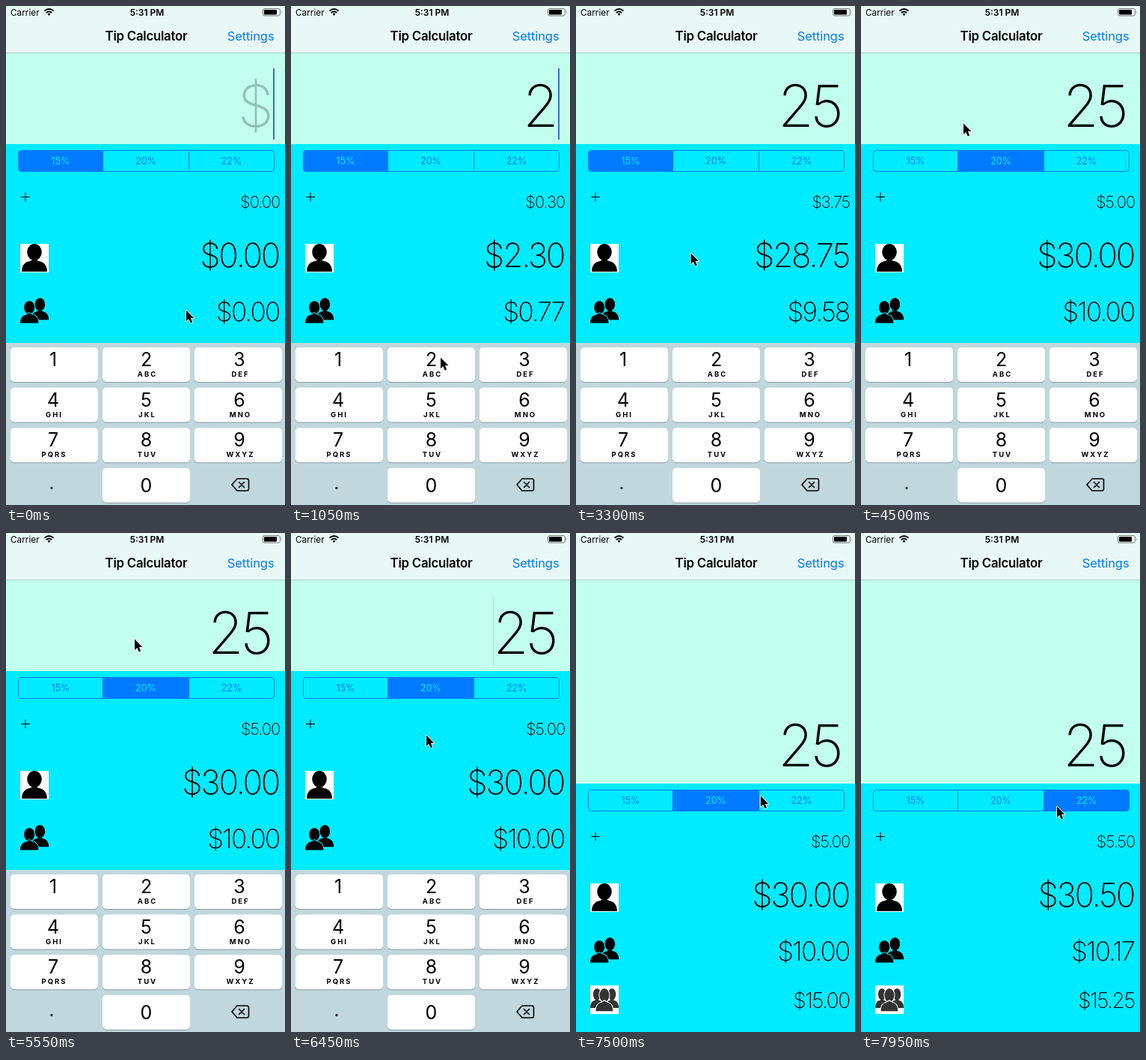
An HTML page that plays this animation: 373x665 px, repeating every 8 s.

```html
<!DOCTYPE html>
<html lang="en">
<head>
<meta charset="utf-8">
<title>Tip Calculator</title>
<style>
  html, body { margin: 0; width: 100%; height: 100%; overflow: hidden; background: #00ebff; }
  svg { display: block; width: 373px; height: 665px; font-family: Inter, Roboto, sans-serif; }
  .thin { font-weight: 200; text-anchor: end; letter-spacing: -.05em; }
  .mid { text-anchor: middle; }
  .end { text-anchor: end; }
  .bold { font-weight: 600; }
  .blue { fill: #007aff; }
</style>
</head>
<body>
<svg viewBox="0 0 373 665">
  <defs>
    <g id="person">
      <ellipse cx="19" cy="11" rx="9.8" ry="11"/>
      <path d="M2 37c0-9 5-13 11-14L19 20l6 3c6 1 11 5 11 14Z"/>
    </g>
  </defs>
  <rect width="373" height="665" fill="#00ebff"/>
  <rect id="field" y="63" width="373" height="121" fill="#c2ffee"/>
  <g id="content">
    <text id="bill" class="thin" x="354" y="161" font-size="77.500"></text>
    <g id="segments"></g>
    <path d="M20 254.5h12M26 248.5v12" stroke="#000" stroke-width="1"/>
    <g id="amounts"></g>
    <rect x="19" y="317" width="38" height="38" fill="#fff"/>
    <use href="#person" x="19" y="317"/>
    <use href="#person" transform="translate(32 389) scale(.7 .79)"/>
    <g stroke="#00ebff" stroke-width="2.5" paint-order="stroke">
      <use href="#person" transform="translate(17.5 393) scale(.72 .8)"/>
    </g>
    <g fill="#333">
      <rect x="19" y="453" width="38" height="38" fill="#fff"/>
      <use href="#person" transform="translate(18 457) scale(.53 .7)"/>
      <use href="#person" transform="translate(38 457) scale(.53 .7)"/>
      <g stroke="#fff" stroke-width="3" paint-order="stroke">
        <use href="#person" transform="translate(25.200 457) scale(.67 .82)"/>
      </g>
    </g>
  </g>
  <rect id="caret" y="83" width="2" height="95" fill="#4169dd"/>
  <g id="keyboard">
    <rect y="449" width="373" height="216" fill="#bfd7dd"/>
    <g id="keys"></g>
    <text class="mid" x="61" y="644" font-size="24">.</text>
    <g fill="none" stroke="#000" stroke-width="1.6" stroke-linejoin="round" stroke-linecap="round">
      <path d="M309 630h13q2.500 0 2.500 2.500v11q0 2.500-2.500 2.500h-13l-7-8Z"/>
      <path d="m311.500 634.500 7 7m0-7-7 7"/>
    </g>
  </g>
  <g id="bar">
    <rect width="373" height="63" fill="#e7f8f6"/>
    <rect y="62" width="373" height="1" fill="#a9d3ca"/>
    <text x="6" y="12.500" font-size="11.800">Carrier</text>
    <g fill="none" stroke="#000" stroke-width="2">
      <path d="M51.500 6.500q6-5 12 0M53.800 9q3.700-3 7.400 0"/>
      <path d="M55.600 10.500q1.900-1.500 3.800 0L57.500 13Z" fill="#000" stroke="none"/>
    </g>
    <text class="mid bold" x="188.500" y="12.500" font-size="12">5:31 PM</text>
    <rect x="343.500" y="3.500" width="23" height="9.500" rx="2.500" fill="none" stroke="#777"/>
    <rect x="345" y="5" width="17" height="6.500" rx="1"/>
    <path d="M368 6.500q1.500 1.700 0 3.500Z" fill="#777"/>
    <text class="mid bold" x="187.500" y="46" font-size="16.800" letter-spacing="-.25">Tip Calculator</text>
    <text class="end blue" x="358.500" y="46" font-size="16.500" letter-spacing="-.1">Settings</text>
  </g>
  <path id="pointer" d="M1 1.500v14.500l3.300-3 2.400 5.500 2.500-1-2.300-5.400h4.400Z" stroke="#fff" stroke-width="1.600" paint-order="stroke" stroke-linejoin="round"/>
</svg>
<script>
const $ = id => document.getElementById(id);
const LOOP = 8000, STEP = 150;

const rates = [15, 20, 22];
const edges = [16.5, 129.5, 244.5, 358.5];
$('segments').innerHTML = rates.map((rate, i) => `
  <path class="segment" d="${[
    'M129.500 192.500H20.500q-4 0-4 4v20q0 4 4 4H129.500Z',
    'M129.500 192.500H244.500V220.500H129.500Z',
    'M244.500 192.500H354.500q4 0 4 4v20q0 4-4 4H244.500Z'][i]}" stroke="#007aff"/>
  <text class="rate mid" x="${(edges[i] + edges[i + 1]) / 2}" y="211" font-size="12.500">${rate}%</text>`).join('');

// baseline, font size
const rows = [[269, 22], [348, 44], [420, 35.2], [483, 28]];
$('amounts').innerHTML = rows.map(([y, size]) =>
  `<text class="thin amount" x="${367 - size * .04}" y="${y}" font-size="${size}"></text>`).join('');

const letters = ['', 'ABC', 'DEF', 'GHI', 'JKL', 'MNO', 'PQRS', 'TUV', 'WXYZ'];
const key = (digit, col, row, label = '') => {
  const x = 6 + col * 123, y = 455 + row * 53.6, cx = 63 + col * 124.5;
  return `<rect x="${x}" y="${y + 1}" width="117" height="46" rx="5" fill="#8a9a9f"/>
    <rect id="key${digit}" x="${x}" y="${y}" width="117" height="46" rx="5" fill="#fff"/>
    <text class="mid" x="${cx}" y="${y + (digit ? 25 : 32)}" font-size="25">${digit}</text>
    <text class="mid" x="${cx + 1.5}" y="${y + 39}" font-size="9.500" font-weight="700" letter-spacing="2">${label}</text>`;
};
$('keys').innerHTML = letters.map((label, i) => key(i + 1, i % 3, Math.floor(i / 3), label)).join('') + key(0, 1, 3);

// time, x, y
const path = [
  [0, 240, 404], [900, 199, 467], [1050, 199, 467], [1500, 187, 527], [1950, 187, 528],
  [2400, 179, 485], [3000, 131, 406], [3750, 185, 211], [4050, 185, 211], [4500, 136, 155],
  [5100, 176, 142], [5250, 171, 140], [5700, 171, 140], [6000, 158, 180], [6450, 180, 268],
  [6750, 180, 268], [7650, 259, 365], [7950, 261, 363]
];
const blinks = [[450, 900], [2250, 2700], [3150, 3600], [4200, 4650], [5550, 6000]];
const within = (t, [from, to]) => t >= from && t < to;

function pointerAt(t) {
  const i = Math.max(1, path.findIndex(p => p[0] >= t));
  const [t0, x0, y0] = path[i - 1], [t1, x1, y1] = path[i];
  const k = (t - t0) / (t1 - t0);
  return [x0 + (x1 - x0) * k, y0 + (y1 - y0) * k];
}

function caretOpacity(t) {
  if (t >= 6750) return 0;
  if (t >= 6450) return .12;
  return blinks.some(b => within(t, b)) ? 0 : 1;
}

function render(t) {
  const bill = t < 1050 ? 0 : t < 1650 ? 2 : 25;
  const chosen = t < 3750 ? 0 : t < 7800 ? 1 : 2;
  const tip = bill * rates[chosen] / 100, total = bill + tip;
  const drop = t < 6750 ? 0 : 150;

  $('bill').textContent = bill || '$';
  $('bill').setAttribute('opacity', bill ? 1 : .24);
  document.querySelectorAll('.amount').forEach((el, i) =>
    el.textContent = '$' + [tip, total, total / 3, total / 2][i].toFixed(2));
  document.querySelectorAll('.segment').forEach((el, i) =>
    el.setAttribute('fill', i === chosen ? '#007aff' : 'none'));
  document.querySelectorAll('.rate').forEach((el, i) =>
    el.setAttribute('fill', i === chosen ? '#00ebff' : '#007aff'));

  $('field').setAttribute('height', 121 + drop);
  $('content').setAttribute('transform', `translate(0 ${drop})`);
  $('keyboard').setAttribute('transform', `translate(0 ${!drop ? 0 : t < 6900 ? 211 : 216})`);
  $('key2').setAttribute('fill', within(t, [900, 1050]) ? '#d3e3e7' : '#fff');
  $('key5').setAttribute('fill', within(t, [1500, 1650]) ? '#d3e3e7' : '#fff');

  $('caret').setAttribute('x', t < 5250 ? 357 : 270);
  $('caret').setAttribute('opacity', caretOpacity(t));
  $('pointer').setAttribute('transform', `translate(${pointerAt(t)})`);
}

function tick() {
  const t = performance.now() % LOOP;
  render(Math.floor(t / STEP) * STEP);
  requestAnimationFrame(tick);
}
tick();
</script>
</body>
</html>
```
